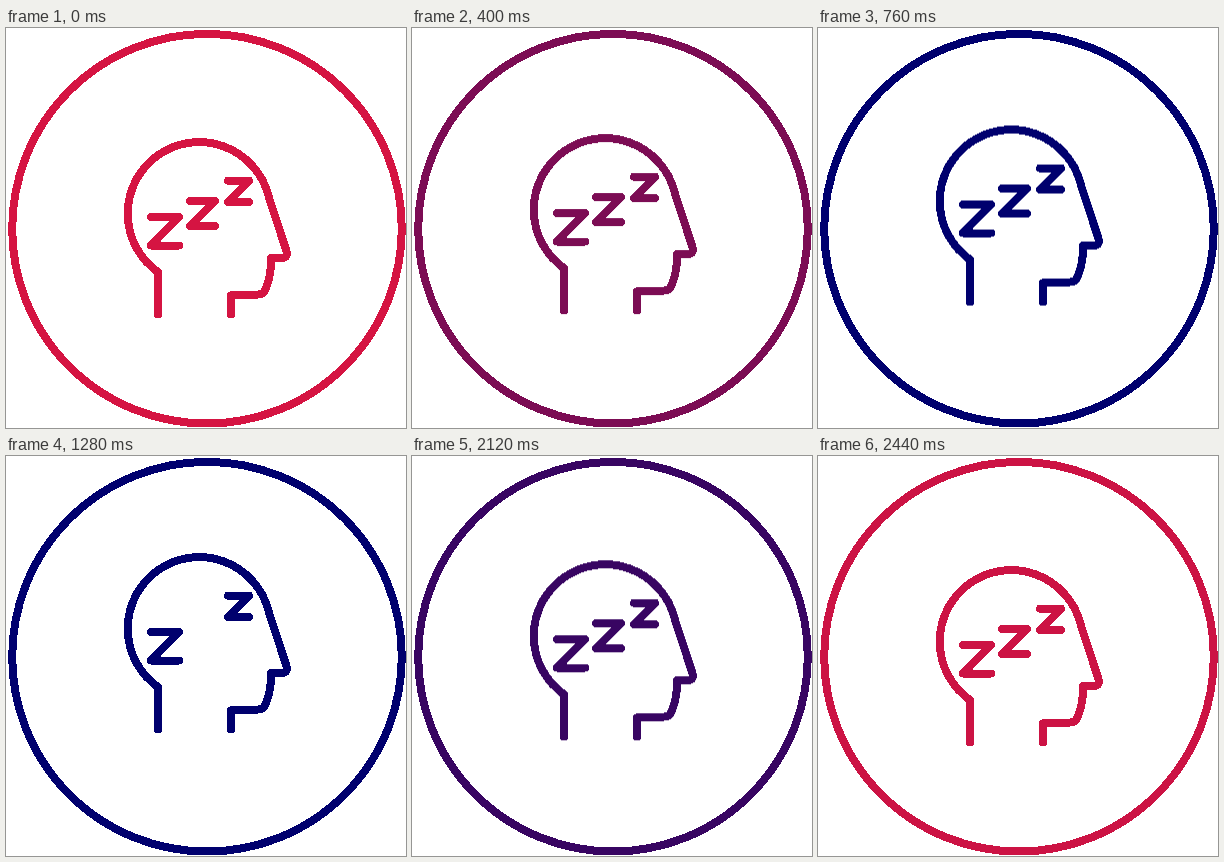
An HTML page that plays this animation: 400x400 px, repeating every 2.64 s.

```html
<!DOCTYPE html>
<html lang="en">
<head>
<meta charset="utf-8">
<title>Sleeping mind</title>
<style>
  :root { --red: #d51442; --navy: #00006e; --loop: 2640ms; }
  html, body { margin: 0; width: 100%; height: 100%; overflow: hidden; background: #fff; }
  svg {
    display: block; width: 100%; height: 100%;
    fill: none; stroke: var(--red); stroke-width: 8;
    stroke-linecap: round; stroke-linejoin: round;
    shape-rendering: crispEdges;
    animation: tint var(--loop) linear infinite;
  }
  .head { animation: nod var(--loop) linear infinite; }
  .z { animation: var(--loop) linear infinite; }
  .z1 { animation-name: blink1; }
  .z2 { animation-name: blink2; }
  .z3 { animation-name: blink3; }

  @keyframes tint {
    0% { stroke: var(--red); }
    6.06% { stroke: var(--red); animation-timing-function: cubic-bezier(.33, .2, .67, .8); }
    27.27%, 75.76% { stroke: var(--navy); }
    93.18%, 100% { stroke: var(--red); }
  }
  @keyframes nod {
    0% { transform: translateY(0); }
    6.06% { transform: translateY(0); animation-timing-function: cubic-bezier(.42, 0, .33, 1); }
    34.85% { transform: translateY(-13px); }
    65.91% { transform: translateY(-13px); animation-timing-function: cubic-bezier(.75, 0, .6, 1); }
    87.88%, 100% { transform: translateY(0); }
  }
  /* the gap runs through the three letters from left to right */
  @keyframes blink1 {
    0%, 40.91%, 46.97%, 100% { opacity: 1; }
    43.94% { opacity: 0; }
  }
  @keyframes blink2 {
    0%, 45.45%, 54.55%, 100% { opacity: 1; }
    48.48%, 51.52% { opacity: 0; }
  }
  @keyframes blink3 {
    0%, 53.03%, 59.09%, 100% { opacity: 1; }
    56.06% { opacity: 0; }
  }
</style>
</head>
<body>
<svg viewBox="0 0 400 400">
  <circle cx="201" cy="200.7" r="194.8"/>
  <g class="head">
    <path d="M152 286.5V244A71.5 71.5 0 1 1 262 166Q264 173 266 179L280.5 223Q282 230 276 230H265V233C265 246 262 256 258.500 263.500Q257 266 252 266.500L225 267.300V286.500"/>
    <path class="z z1" d="M145 189h28l-28 28.500h28"/>
    <path class="z z2" d="M184 173h25l-25 25h25"/>
    <path class="z z3" d="M222 152.700h21l-21 21.300h21"/>
  </g>
</svg>
</body>
</html>
```
